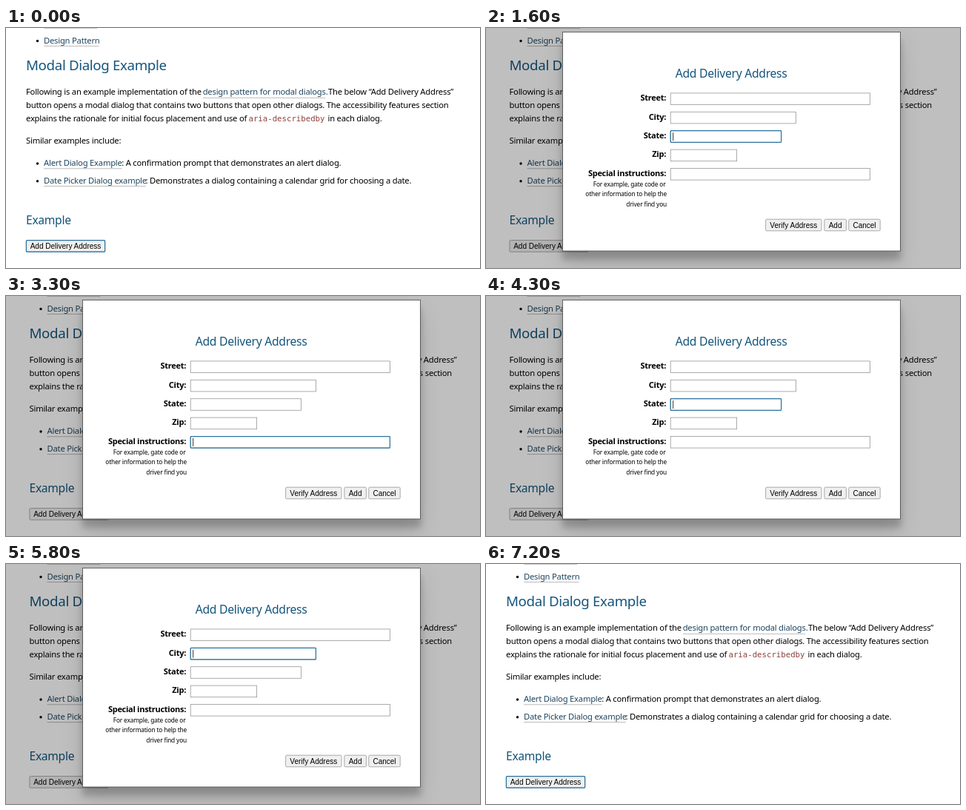
These frames come from a looping animation (640 by 324 pixels, 7.4 s). An HTML page:

```html
<!DOCTYPE html>
<html lang="en">
<head>
<meta charset="utf-8">
<title>Modal dialog focus</title>
<style>
html, body { margin: 0; width: 100%; height: 100%; overflow: hidden; background: #fff; }
svg { display: block; width: 640px; height: 324px; font: 11.2px "Noto Sans", sans-serif; }
text { letter-spacing: -.018em; }
.h { fill: #14557c; }
.link { fill: #20465f; }
.under { stroke: #b4b4b4; stroke-width: .9; }
.code { font: 10.7px "DejaVu Sans Mono", monospace; letter-spacing: 0; fill: #8c4038; }
.label { font-size: 11px; font-weight: 600; letter-spacing: -.025em; text-anchor: end; }
.help { font-size: 8.3px; text-anchor: end; }
.btn { font: 10px "Liberation Sans", Arial, sans-serif; letter-spacing: 0; text-anchor: middle; }
.box { stroke: #979797; stroke-width: .8; }
#dialog > .panel { fill: #fff; stroke: #444; stroke-width: .8; }
.ring { fill: none; stroke: #2f74a0; stroke-width: 1.25; }
.shadow { filter: drop-shadow(0 14px 14px rgba(0,0,0,.12)) drop-shadow(0 11px 4.5px rgba(0,0,0,.2)); }
</style>
</head>
<body>
<svg viewBox="0 0 640 324">
  <g id="page">
    <path class="under" d="M51 .3H123M51 24.4H125.5M266 94.3H431M51 189.8H156.5M51 213.6H188.5"/>
    <circle cx="42.5" cy="17.5" r="1.7"/>
    <circle cx="42.5" cy="183" r="1.7"/>
    <circle cx="42.5" cy="206.8" r="1.7"/>
    <text class="link" x="51" y="20.5">Design Pattern</text>
    <text class="h" x="27" y="57" font-size="18.7">Modal Dialog Example</text>
    <text y="90"><tspan x="27">Following is an example implementation of the</tspan><tspan class="link" x="265.7">design pattern for modal dialogs.</tspan><tspan x="435">The below “Add Delivery Address”</tspan></text>
    <text x="27" y="108">button opens a modal dialog that contains two buttons that open other dialogs. The accessibility features section</text>
    <text y="126"><tspan x="27">explains the rationale for initial focus placement and use of</tspan><tspan class="code" x="327.5">aria-describedby</tspan><tspan x="434.5">in each dialog.</tspan></text>
    <text x="27" y="156">Similar examples include:</text>
    <text y="186"><tspan class="link" x="51">Alert Dialog Example</tspan><tspan x="156.2">: A confirmation prompt that demonstrates an alert dialog.</tspan></text>
    <text y="209.6"><tspan class="link" x="51">Date Picker Dialog example</tspan><tspan x="188.5">: Demonstrates a dialog containing a calendar grid for choosing a date.</tspan></text>
    <text class="h" x="27" y="265" font-size="15.6">Example</text>
  </g>
  <rect id="shade" width="640" height="324" fill-opacity=".25"/>
  <g id="dialog">
    <rect class="panel shadow" x="103.5" y="5.4" width="456" height="295.6"/>
    <text class="h" x="255.7" y="67" font-size="15.7">Add Delivery Address</text>
    <text class="help" y="214.2"><tspan x="242.5">For example, gate code or</tspan><tspan x="244" dy="13.2">other information to help the</tspan><tspan x="244" dy="13.2">driver find you</tspan></text>
  </g>
  <rect id="ring" class="ring" rx="1"/>
  <path id="caret" stroke="#000" stroke-width=".8"/>
</svg>
<script>
const $ = id => document.getElementById(id);
const LOOP = 7400, OPEN = 500, CLOSE = 6900, SHIFT = 4.5, BLINK = 500;

function add(parent, tag, attrs, text = '') {
  const el = document.createElementNS('http://www.w3.org/2000/svg', tag);
  set(el, attrs);
  el.textContent = text;
  parent.append(el);
}
function set(el, attrs) {
  for (const k in attrs) el.setAttribute(k, attrs[k]);
}
function button(parent, label, x, y, width) {
  const box = { x, y, width, height: 15.6 };
  add(parent, 'rect', { ...box, rx: 1.5, class: 'box', fill: '#f0f0f0' });
  add(parent, 'text', { x: x + width / 2, y: y + 11.4, class: 'btn' }, label);
  return box;
}

const opener = button($('page'), 'Add Delivery Address', 27.4, 286.6, 106.2);

// Tab stops in order: five fields, then three buttons
const fields = [['Street:', 269.2], ['City:', 169.2], ['State:', 149.4], ['Zip:', 89.4], ['Special instructions:', 269.2]];
const stops = fields.map(([label, width], i) => {
  const box = { x: 249.2, y: 87.9 + 25.4 * i, width, height: 15.6 };
  add($('dialog'), 'rect', { ...box, class: 'box', fill: '#fff' });
  add($('dialog'), 'text', { x: 243, y: 98.2 + 25.4 * i, class: 'label' }, label);
  return box;
});
stops.push(
  button($('dialog'), 'Verify Address', 377.6, 258.2, 75.4),
  button($('dialog'), 'Add', 456.8, 258.2, 29.6),
  button($('dialog'), 'Cancel', 489.8, 258.2, 42.4));

// Key presses: Tab moves on, Shift+Tab moves back, wrapping inside the dialog
const forward = [1400, 1600, 1900, 2000, 2200, 2300, 2500, 2700, 2900, 3100, 3200, 3300, 3400];
const back = [4000, 4100, 4300, 4500, 4600, 4700, 4900, 5100, 5200, 5400, 5600, 5800, 6000, 6300];
const keys = [...forward, ...back];

function draw(t) {
  const open = t >= OPEN && t < CLOSE;
  const count = list => list.filter(k => k <= t).length;
  const n = stops.length;
  const at = (count(forward) - count(back) + 2 * n) % n;
  const since = t - Math.max(OPEN, ...keys.filter(k => k <= t));
  const box = open ? stops[at] : opener;

  $('page').setAttribute('transform', `translate(${open ? SHIFT : 0})`);
  $('shade').style.display = $('dialog').style.display = open ? '' : 'none';
  set($('ring'), box);
  const caret = open && at < fields.length && since % (2 * BLINK) < BLINK;
  $('caret').setAttribute('d', caret ? `M252.6 ${box.y + 2.4}v11` : '');
}

function tick() {
  draw(performance.now() % LOOP);
  requestAnimationFrame(tick);
}
tick();
</script>
</body>
</html>
```
